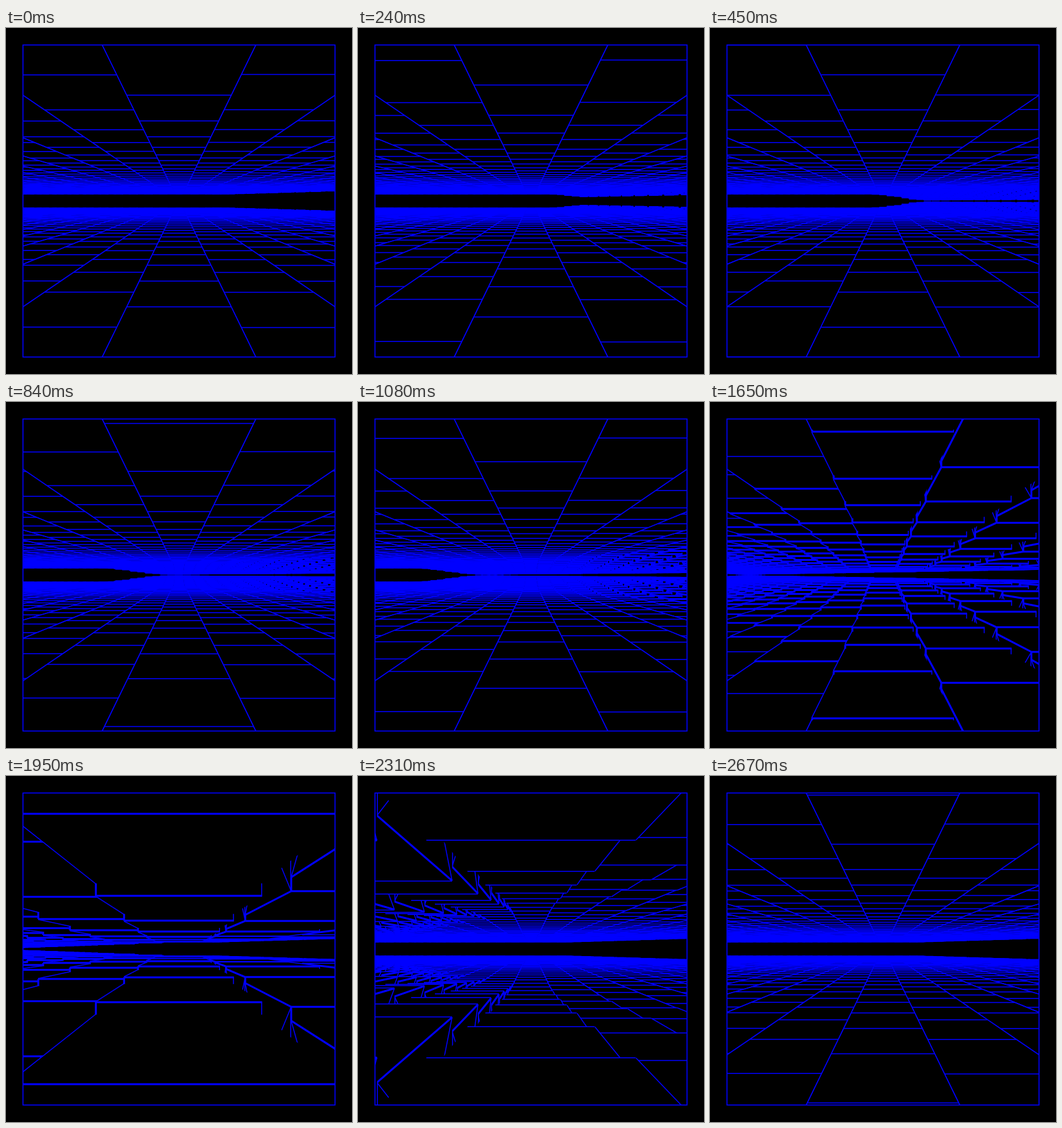
An HTML page with a canvas that plays this animation: 540x540 px, repeating every 2700 ms.

```html
<!DOCTYPE html>
<html>
<head>
<meta charset="utf-8">
<title>Brick wave</title>
<style>
html, body { margin: 0; width: 100%; height: 100%; overflow: hidden; background: #000; }
canvas { display: block; }
</style>
</head>
<body>
<canvas id="stage" width="540" height="540"></canvas>
<script>
const canvas = document.getElementById('stage');
const ctx = canvas.getContext('2d');

const BLUE = '#00f';
const STEP = 30, STEPS = 90;      // ms per step, steps per loop
const MID = 270, HALF = 243;
const SCALE = 517;                // pixels per unit at distance 1
const WIDTH = 0.977;              // brick width relative to the ceiling height
const NEAR = 0.3, FAR = 43.6;
const ORIGIN = 0.113, LAST_ROW = 53, MAX_COL = 22;
const LINE = 3;

// Height of a brick; the wave runs along the skewed row coordinate s.
function heightAt(s, step) {
  const phase = 0.22 * (s + 0.96 * step - 53.9);
  return phase <= 0 || phase >= 2 * Math.PI ? 1 : 1 - 0.413 * (1 - Math.cos(phase));
}

const point = (x, h, z) => [MID + SCALE * WIDTH * x / z, MID - SCALE * h / z];

function fill(...points) {
  ctx.beginPath();
  points.forEach(p => ctx.lineTo(p[0], p[1]));
  ctx.fill();
}

function line(a, b, width = LINE) {
  ctx.lineWidth = width;
  ctx.beginPath();
  ctx.moveTo(a[0], a[1]);
  ctx.lineTo(b[0], b[1]);
  ctx.stroke();
}

function drawBrick(col, s, step, z, isLast) {
  const h = heightAt(s, step);
  const z0 = Math.max(z, NEAR), z1 = Math.min(z + 1, FAR);
  const side = Math.sign(col);
  const outerSides = side ? [side] : [-1, 1];
  const inner = col - side / 2;
  const at = (x, up, d) => point(x, h + up, d);

  if (SCALE * WIDTH * (Math.abs(col) - 0.5) / z1 > HALF + 4) return;
  if (SCALE * h / z1 > HALF + 4) return;

  const frontL = at(col - 0.5, 0, z0), frontR = at(col + 0.5, 0, z0);
  const backL = at(col - 0.5, 0, z1), backR = at(col + 0.5, 0, z1);

  // Vertical faces only show on lowered bricks.
  if (h < 1) {
    fill(frontL, frontR, at(col + 0.5, 1, z0), at(col - 0.5, 1, z0));
    if (side) {
      const low0 = at(inner, 0, z0), low1 = at(inner, 0, z1);
      const top0 = at(inner, 1, z0), top1 = at(inner, 1, z1);
      fill(low0, low1, top1, top0);
      line(low0, top1, LINE / 2);
      line(low1, top0, LINE / 2);
      line(low0, top0);
    }
    for (const e of outerSides) {
      const a = at(col + e / 2, 0, z0), b = at(col + e / 2, 1, z0);
      const covered = heightAt(s + 1.5 * e - 0.5, step) < h;
      const shift = covered ? -e * LINE / 4 : 0;
      a[0] += shift;
      b[0] += shift;
      line(a, b, covered ? LINE / 2 : LINE);
    }
  }

  // Edges whose inner half is hidden by the underside.
  const zMid = Math.min(Math.max(z + 0.5, z0), z1);
  for (const e of outerSides) {
    const x = col + e / 2;
    if (heightAt(s + 1.5 * e - 0.5, step) >= h) line(at(x, 0, z0), at(x, 0, zMid));
    if (heightAt(s + 1.5 * e + 0.5, step) >= h) line(at(x, 0, zMid), at(x, 0, z1));
  }
  if (isLast || heightAt(s + 1, step) > h) line(backL, backR);

  fill(frontL, frontR, backR, backL);
  if (side) line(at(inner, 0, z0), at(inner, 0, z1));
  line(frontL, frontR);
}

function drawColumn(col, step) {
  const travel = step / 30;
  const offset = ORIGIN - travel - 1.504 * col;
  const last = Math.min(LAST_ROW, Math.ceil(FAR - offset) - 1);
  for (let row = last; row + offset + 1 > NEAR; row--) {
    drawBrick(col, row + ORIGIN - travel, step, row + offset, row === last);
  }
}

function draw(step) {
  ctx.fillStyle = '#000';
  ctx.strokeStyle = BLUE;
  ctx.fillRect(0, 0, 540, 540);

  // Rays only move outwards, so outer columns are painted first.
  ctx.save();
  ctx.beginPath();
  ctx.rect(MID - HALF, MID - HALF, 2 * HALF, HALF);
  ctx.clip();
  for (let col = MAX_COL; col > 0; col--) {
    drawColumn(col, step);
    drawColumn(-col, step);
  }
  drawColumn(0, step);
  ctx.restore();

  // The floor mirrors the ceiling.
  ctx.save();
  ctx.setTransform(1, 0, 0, -1, 0, 540);
  ctx.drawImage(canvas, 0, 0, 540, MID, 0, 0, 540, MID);
  ctx.restore();

  ctx.lineWidth = 1.6;
  ctx.strokeRect(26.5, 26.5, 487, 487);
}

let start = null, shown = -1;
function tick(now) {
  if (start === null) start = now;
  const step = Math.floor((now - start) / STEP) % STEPS;
  if (step !== shown) draw(shown = step);
  requestAnimationFrame(tick);
}
draw(0);
requestAnimationFrame(tick);
</script>
</body>
</html>
```
